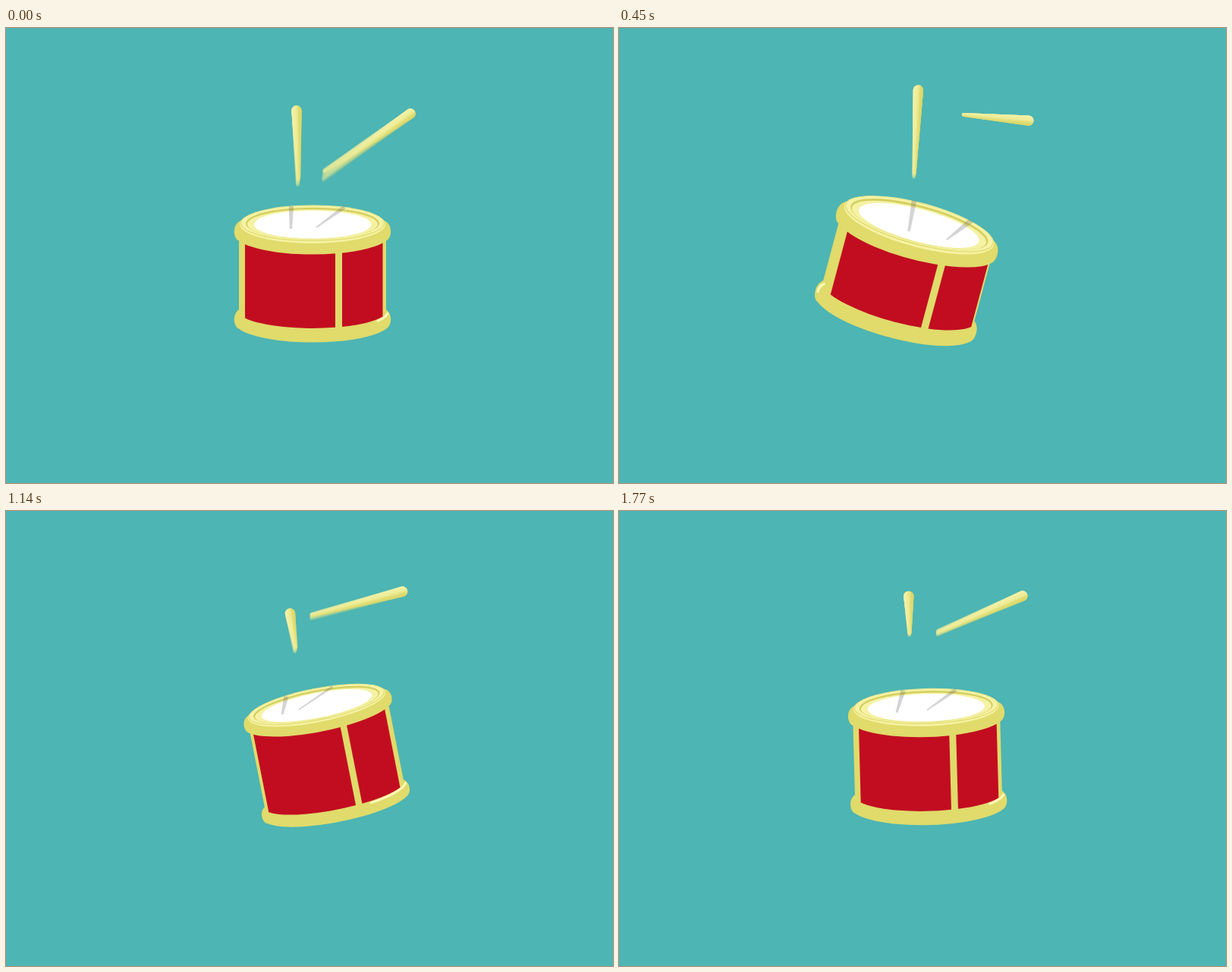
An HTML page with a canvas for the animation above (1.8 s loop, 800 by 600 pixels).

```html
<!DOCTYPE html>
<html lang="en">
<head>
<meta charset="utf-8">
<title>Drum</title>
<style>
html, body { margin: 0; width: 100%; height: 100%; overflow: hidden; background: #4db5b3; }
canvas { display: block; width: 800px; height: 600px; }
</style>
</head>
<body>
<canvas id="stage" width="800" height="600"></canvas>
<script>
const ctx = document.getElementById('stage').getContext('2d');
const LOOP = 1800, STEP = 30, BEAT = 300;
const TEAL = '#4db5b3', GOLD = '#e0db6b', DARK = '#d3cf61', PALE = '#f6f2a4', RED = '#c20d21';

// [time within a beat, value]
const LEFT_LIFT = [[0, 63], [25, 4], [60, 55], [105, 104], [150, 75], [180, 22], [195, 4], [240, 86], [270, 104], [300, 63]];
const RIGHT_LIFT = [[0, 72], [20, 2], [60, 134], [105, 165], [156, 165], [180, 0], [240, 126], [270, 102], [300, 72]];
const WIDTH = [[0, 197], [60, 214], [105, 189], [150, 219], [180, 209], [240, 204], [270, 197], [300, 197]];

function sample(keys, t) {
  const p = ((t % BEAT) + BEAT) % BEAT;
  const i = keys.findIndex(k => k[0] > p);
  const [t0, a] = keys[i - 1], [t1, b] = keys[i];
  return a + (b - a) * (p - t0) / (t1 - t0);
}

function poseAt(t) {
  const phase = 2 * Math.PI * t / LOOP;
  const angle = Math.sin(phase) * 15 * Math.PI / 180;
  const s = Math.sin(angle);
  const width = sample(WIDTH, t) + 9 * Math.cos(phase);
  return {
    angle, s,
    q: width / 206,
    e: 1 + 0.6 * s, // the head opens towards the viewer as it leans
    half: 58 * (1 - (width - 206) * 0.0058),
    x: 404 - 97 * s,
    y: 326 - 60 * s * s
  };
}

// From a point on the drum head to the stage
function toStage(p, x, y) {
  const c = Math.cos(p.angle);
  const lx = x * p.q, ly = y * p.e - p.half;
  return [p.x + lx * c - ly * p.s, p.y + lx * p.s + ly * c];
}

function oval(x, y, rx, ry, fill) {
  ctx.beginPath();
  ctx.ellipse(x, y, rx, ry, 0, 0, 7);
  ctx.fillStyle = fill;
  ctx.fill();
}

function hoop(y) {
  ctx.save();
  ctx.translate(0, y);
  const a = Math.acos(98 / 103);
  ctx.beginPath();
  ctx.moveTo(-94, -14);
  ctx.bezierCurveTo(-106, -10, -105, 8, -98, 12.3);
  ctx.ellipse(0, 3.6, 103, 27, 0, Math.PI - a, a, true);
  ctx.bezierCurveTo(105, 8, 106, -10, 94, -14);
  ctx.closePath();
  ctx.fillStyle = GOLD;
  ctx.fill();
  ctx.restore();
}

function panel(x0, x1, top, bottom, fill) {
  ctx.beginPath();
  ctx.moveTo(x0, top);
  ctx.lineTo(x1, top);
  ctx.ellipse(0, bottom - 13, 100, 25, 0, Math.acos(x1 / 100), Math.acos(x0 / 100));
  ctx.closePath();
  ctx.fillStyle = fill;
  ctx.fill();
}

function shine(s, y) {
  ctx.beginPath();
  if (s > 0.05) {
    ctx.moveTo(-100, y + 1);
    ctx.quadraticCurveTo(-100, y - 6, -95, y - 9);
  } else {
    const from = 86 + 200 * Math.min(s, 0);
    ctx.ellipse(0, y - 11, 100, 26, 0, Math.acos(0.99), Math.acos(from / 100));
  }
  ctx.strokeStyle = '#fdf9bd';
  ctx.lineWidth = 3;
  ctx.lineCap = 'round';
  ctx.stroke();
}

function shadow(x, y, ex, ey, tipW, endW) {
  const d = Math.hypot(ex - x, ey - y), nx = (y - ey) / d, ny = (ex - x) / d;
  ctx.beginPath();
  ctx.moveTo(x + nx * tipW, y + ny * tipW);
  ctx.lineTo(ex + nx * endW, ey + ny * endW);
  ctx.lineTo(ex - nx * endW, ey - ny * endW);
  ctx.lineTo(x - nx * tipW, y - ny * tipW);
  ctx.closePath();
  ctx.fillStyle = 'rgba(85,85,95,.25)';
  ctx.fill();
}

// Where each stick meets the head
const leftSpot = (s, t) => [-16 + 80 * s - 0.2 * sample(LEFT_LIFT, t), -3 + 15 * s];
const rightSpot = s => [5 + 144 * s - 72 * s * s, -5 + 15 * s];

function drawDrum(p, left, right) {
  const { s } = p, h = p.half / p.e;
  const turn = 20 * s;
  ctx.save();
  ctx.translate(p.x, p.y);
  ctx.rotate(p.angle);
  ctx.scale(p.q, p.e);

  hoop(h);
  panel(-97, 97, -h, h, GOLD);
  shine(s, h);
  panel(-89 + turn, 30 + turn, -h, h, RED);
  panel(39 + turn, 92.5 + turn / 2, -h, h, RED);
  hoop(-h);

  const top = -h - 10;
  oval(0, top + 0.7, 96, 25.3, PALE);
  oval(0, top - 0.3, 95, 23.6, GOLD);
  oval(0, top - 0.8, 94, 22.8, PALE);
  oval(0, top - 0.3, 88, 21, DARK);
  oval(0, top + 0.8, 86, 19.6, PALE);
  oval(0, top + 1.2, 77, 18.5, '#fff');

  ctx.beginPath();
  ctx.ellipse(0, top, 96, 25, 0, 0, 7);
  ctx.clip();
  ctx.translate(0, -h);
  shadow(...left, -28 + 55 * s, -33 - 10 * s, 1.5, 3.2);
  shadow(...right, 42 + 80 * s, -32, 0.8, 2.6 + 4 * s);
  ctx.restore();
}

function stick(gx, gy, tx, ty) {
  const len = Math.hypot(tx - gx, ty - gy);
  const shade = ctx.createLinearGradient(0, -7, 0, 7);
  shade.addColorStop(0, '#d9d465');
  shade.addColorStop(0.3, '#e3de70');
  shade.addColorStop(0.55, '#f3ee98');
  shade.addColorStop(1, '#f8f4a8');
  ctx.save();
  ctx.translate(gx, gy);
  ctx.rotate(Math.atan2(ty - gy, tx - gx));
  ctx.beginPath();
  ctx.moveTo(0, -6.7);
  ctx.lineTo(len - 2, -2.4);
  ctx.arc(len - 2, 0, 2.4, -Math.PI / 2, Math.PI / 2);
  ctx.lineTo(0, 6.7);
  ctx.arc(0, 0, 6.7, Math.PI / 2, -Math.PI / 2);
  ctx.fillStyle = shade;
  ctx.fill();
  ctx.restore();
}

// Overlaid copies across a short shutter give the soft, fast tips
function drawStick(p, t, grip, spot, keys, lean) {
  const [x, y] = toStage(p, ...spot);
  ctx.globalAlpha = 0.25;
  for (let i = -6; i <= 6; i++) {
    const lift = sample(keys, t + i / 2);
    stick(...grip, x + lean * lift, y - lift);
  }
  ctx.globalAlpha = 1;
}

function draw(t) {
  const p = poseAt(t), { s } = p;
  const left = leftSpot(s, t), right = rightSpot(s);
  ctx.fillStyle = TEAL;
  ctx.fillRect(0, 0, 800, 600);
  drawDrum(p, left, right);
  drawStick(p, t, [383 + 44 * s, 109 - 122 * s + 68 * s * s], left, LEFT_LIFT, 0.16 - 0.25 * s);
  drawStick(p, t, [533 + 42 * s - 62 * s * s, 113 + 35 * s], right, RIGHT_LIFT, 0.125);
}

const start = performance.now();
function frame() {
  const t = (performance.now() - start) % LOOP;
  draw(Math.floor(t / STEP) * STEP);
  requestAnimationFrame(frame);
}
frame();
</script>
</body>
</html>
```
